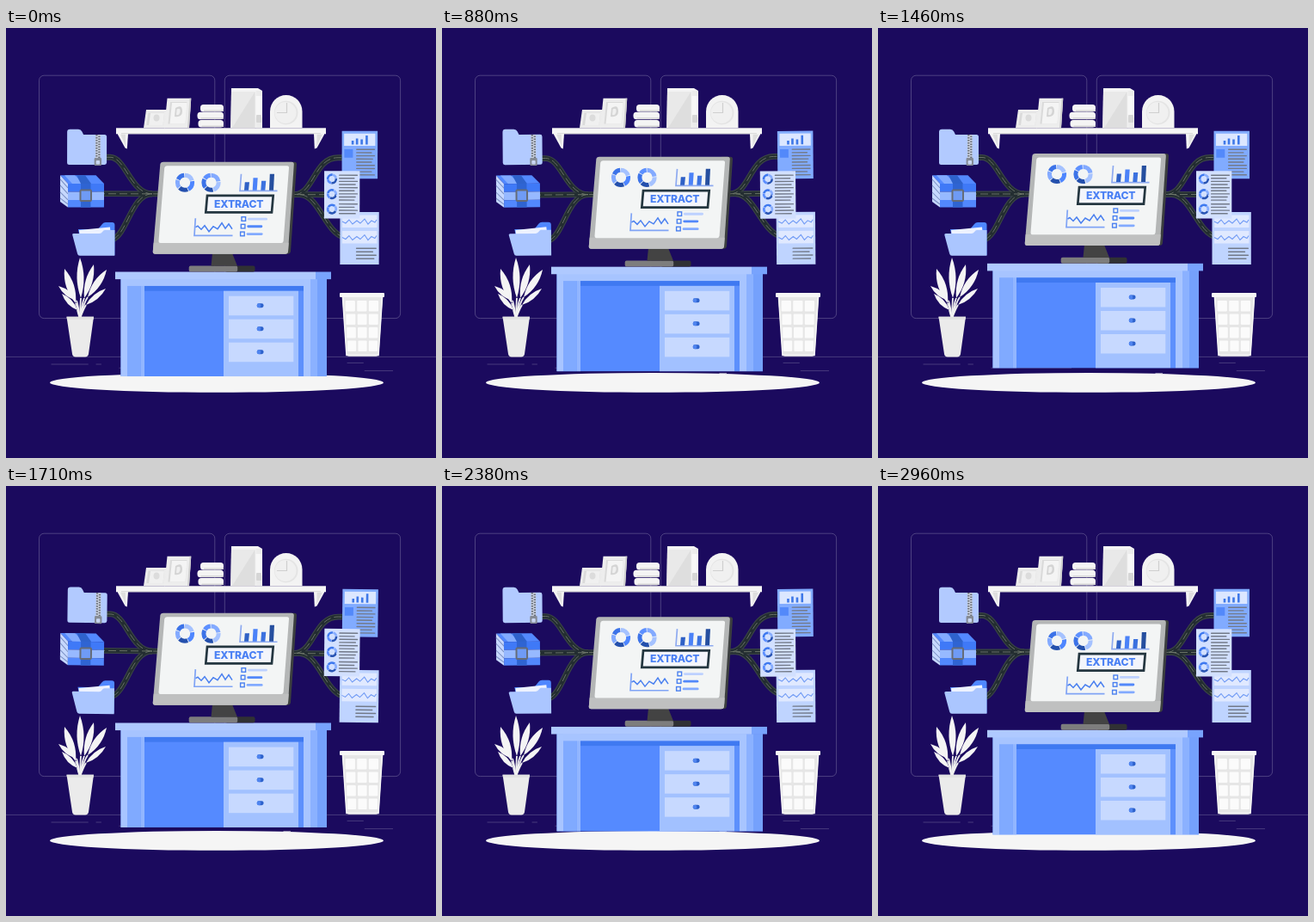
These frames come from a looping animation (500 px wide and 500 px high, 3 s). An HTML page:

```html
<!DOCTYPE html>
<html lang="en">
<head>
<meta charset="utf-8">
<title>Extract</title>
<style>
html, body { margin: 0; width: 100%; height: 100%; overflow: hidden; background: #1b0a5e; }
svg { display: block; width: 100vw; height: 100vh; }
text { font: 800 12.2px Inter, "Open Sans", sans-serif; }
</style>
</head>
<body>
<svg id="stage" viewBox="0 0 500 500"></svg>
<script>
const rect = (x, y, w, h, fill, r = 0) =>
  `<rect x="${x}" y="${y}" width="${w}" height="${h}" rx="${r}" fill="${fill}"/>`;
const shape = (d, fill) => `<path d="${d}" fill="${fill}"/>`;
const line = (d, color, w = 1, extra = '') =>
  `<path d="${d}" fill="none" stroke="${color}" stroke-width="${w}" ${extra}/>`;
const group = (id, ...parts) => `<g id="${id}">${parts.join('')}</g>`;
const each = (list, draw) => list.map(draw).join('');

// Ring made of coloured arcs; parts are [percent, colour]
function donut(x, y, r, w, turn, parts) {
  let at = 0;
  return `<g transform="rotate(${turn} ${x} ${y})">` + each(parts, ([size, color]) => {
    const arc = `<circle cx="${x}" cy="${y}" r="${r}" fill="none" stroke="${color}" stroke-width="${w}"
      pathLength="100" stroke-dasharray="${size - 1.5} 200" stroke-dashoffset="${-at}"/>`;
    at += size;
    return arc;
  }) + '</g>';
}

// Rows of text shown as thin strokes of uneven length
const rows = (x, y, w, n, gap) => each([...Array(n).keys()], i =>
  rect(x, y + i * gap, w * (i % 3 == 1 ? .84 : i % 4 == 3 ? .9 : 1), 1.4, '#737a88', .6));

function leaf([tx, ty, bx, by, w]) {
  const len = Math.hypot(tx - bx, ty - by);
  const nx = (ty - by) / len * w, ny = (bx - tx) / len * w;
  const mx = (tx + bx) / 2, my = (ty + by) / 2;
  return shape(`M${bx} ${by}Q${mx + nx} ${my + ny} ${tx} ${ty}Q${mx - nx} ${my - ny} ${bx} ${by}`, '#f4f4f4') +
    line(`M${bx} ${by}Q${(bx + 86) / 2} ${by + 6} 86 338`, '#f0f0f0', 1.8);
}

const faint = '#5b508c';
const wall =
  each([38.5, 254.3], x => `<rect x="${x}" y="55.2" width="204.3" height="282.4" rx="5.7" fill="none" stroke="${faint}" stroke-width=".8"/>`) +
  line('M0 382.4H500', faint, .7) +
  line('M52.5 391H95.7M104.6 391H110.9M131.5 395.3H225M396.6 389.4H415.8M416.8 398.6H450M322.5 401.4H331', faint, .7);

const shelf =
  shape('M130 123H142L140.8 140.5L138.5 139.5L130 124Z', '#f4f4f4') +
  shape('M133 123.5H139V137Z', '#dedede') +
  shape('M370 123H358L358.8 140.5L361.5 139.5L370 124Z', '#f4f4f4') +
  shape('M368 123.5H361.5V137Z', '#dedede') +
  rect(128, 116.3, 244, 7, '#f5f5f5') + rect(134, 122, 232, 1.2, '#dcdcdc') +
  shape('M163 95H187L185 116.3H160Z', '#ececec') +
  shape('M165.5 98.5H184L182.5 113H163.5Z', '#dadada') +
  shape('M168 99H184L182.5 113H166Z', '#f0f0f0') +
  `<ellipse cx="175" cy="104.5" rx="3.5" ry="4" fill="#dcdcdc"/>` +
  shape('M187.5 81.7H215.3L213 116.3H184Z', '#ededed') +
  shape('M213.5 81.7H215.3L213 116.3H211Z', '#cfcfcf') +
  shape('M191 86H210.5L208.5 111.5H188.5Z', '#dadada') +
  shape('M193 87H210.5L208.5 111.5H190.5Z', '#f4f4f4') +
  shape('M197 93Q205 88 205 97Q205 104 196 103Z', '#d4d4d4') +
  shape('M198.5 94.5Q203 92 202.5 97T198 101Z', '#efefef') +
  each([[226, 89, 27], [222.5, 97.7, 30.5], [223.5, 107, 29.5]], ([x, y, w]) =>
    rect(x, y, w, 8.6, '#f4f4f4', 3.5) + rect(x + 4, y + 6.4, w - 4, 1.6, '#d9d9d9')) +
  shape('M262 70H293L298 73V116.3H261.5Z', '#f4f4f4') +
  shape('M262 74H289.5V116.3H261Z', '#e9e9e9') + shape('M289.5 74V116.3H263Z', '#dedede') +
  rect(290.5, 73, 7.5, 43.3, '#ebebeb') + rect(290.5, 79, 7.5, 25, '#f7f7f7') +
  rect(291, 101, 6, 9, '#d6d6d6', 1) +
  shape('M307 116.3V97A18.7 19 0 0 1 344.5 97V116.3Z', '#f3f3f3') +
  `<circle cx="325.7" cy="98.5" r="13.8" fill="#e4e4e4"/><circle cx="325" cy="98.5" r="12.5" fill="#f0f0f0"/>` +
  line('M326.5 87V98.5H315', '#cfcfcf', 1.2);

const ends = ['M106 193H180', 'M116 150.5H121C139 150.5 145 193 170 193', 'M124 246C141 240 146 193 170 193',
  'M325 193.5H376', 'M335 193.5C358 193.5 358 150.5 386 150.5H394', 'M342 193.5C364 195 371 237 393 243'];
const pipes = each(ends, d => line(d, '#3a4545', 6.8)) + each(ends, d => line(d, '#232d31', 4.6)) +
  each(ends, d => line(d, '#70796c', .9, 'stroke-dasharray="9 4"'));

const leftIcons =
  // zipped folder
  shape('M71 121Q71 117.7 74.3 117.7H84Q87 117.7 88.3 120.5L90 124H114.5Q117 124 117 126.5V156.5Q117 159 114.5 159H73.5Q71 159 71 156.5Z', '#b2caff') +
  rect(104, 124, 5.6, 28, '#c9cfdd') +
  line('M105.3 124V151', '#69707b', 2.2, 'stroke-dasharray="1.5 1.5"') +
  line('M108.3 125.5V152', '#69707b', 2.2, 'stroke-dasharray="1.5 1.5"') +
  rect(102.6, 151, 8.4, 9, '#858b95', 1.2) + rect(104.6, 154, 4.4, 4.5, '#c9d6f2', 1) +
  // parcel
  shape('M63 171.3H104.5L114 181H72Z', '#5389ff') +
  shape('M68 171.3H80L90 181H77Z', '#82abff') +
  shape('M82 171.3H92L99 181H87Z', '#2e62cc') +
  shape('M63 171.3L72 181V208.5L63 202Z', '#c6d8ff') +
  line('M63 176L72 186M63 183L72 193M63 191L72 200M63 198L72 205', '#7a8fc0', 1) +
  rect(72, 181, 42, 9.5, '#3f79f7') + rect(72, 190.5, 42, 9.5, '#97b9ff') +
  rect(72, 200, 42, 8.5, '#5288fd') + rect(87, 181, 11.5, 27.5, '#2f64d2') +
  `<rect x="86.5" y="188.5" width="12.5" height="12.5" rx="1" fill="#6f9bf5" stroke="#656c78" stroke-width="2"/>` +
  // open folder
  shape('M84 234H107L112 228Q113.5 226 116 226H123.5Q126.5 226 126.5 229V264H90Z', '#4f87ff') +
  shape('M85 235L121 231.5L124 262H88Z', '#edf2ff') +
  shape('M77.3 240.5Q77 239 79 239H108.5Q111 239 112.2 237T115 235H126.5V264.8H86Q83.7 264.8 83.2 262.5Z', '#abc6ff');

const zigzag = y => line(`M391 ${y}l4 2 4-4 4 5 5-4 4 3 5-5 4 6 4-4 4 2 2-3`, '#729cf5', 1.1);
const blues = [[30, '#3d78ef'], [20, '#87adff'], [30, '#2854b4'], [20, '#5b8eff']];
const rightIcons =
  rect(390.5, 119.8, 41.5, 55.5, '#81abff') + rect(393, 122.8, 36.3, 14.2, '#dce7ff') +
  line('M403 135.5V131M408 135.5V128.5M413.5 135.5V129.5M419.3 135.5V125', '#3e78e8', 2.6) +
  rect(393.3, 141, 10, 9.8, '#5389fa') + rows(407, 140.5, 22, 9, 3.7) +
  rect(388.5, 214, 45.3, 61, '#bfd4ff') + rect(391, 217.5, 40.5, 14.5, '#e0e9ff') +
  rect(391, 236, 40.5, 14.5, '#e0e9ff') + zigzag(225) + zigzag(243.5) + rows(407, 255.5, 24, 4, 4) +
  rect(370, 166.2, 41.3, 55.3, '#d2e0ff') +
  each([175.5, 193.2, 210.6], y => donut(379, y, 4.8, 2.6, y, blues)) +
  rows(387, 170.5, 22, 4, 3.6) + rows(387, 185, 22, 5, 3.6) + rows(387, 204, 22, 4, 3.7);

const desk =
  rect(133.5, 292, 239.5, 113.3, '#558aff') +
  rect(133.5, 292, 7.5, 113.3, '#a8c5ff') + rect(141, 292, 15.5, 113.3, '#80aaff') +
  rect(156.5, 292, 4.5, 113.3, '#92b6ff') +
  rect(161, 300, 185, 6, '#3f79f1') + rect(141, 292, 205, 8.2, '#a7c4ff') +
  rect(253, 306, 87, 99.3, '#a2c1ff') + rect(340, 306, 6, 99.3, '#5d90fc') +
  each([312, 339, 366], y => rect(259, y, 75.3, 22.5, '#c7d9ff') +
    rect(291.8, y + 8.5, 7.8, 5, '#2d62cc', 2.4) + rect(291.8, y + 8.5, 4.4, 5, '#4f84ef', 2)) +
  rect(346, 292, 8, 113.3, '#a8c5ff') + rect(354, 292, 8, 113.3, '#8bb1ff') +
  rect(362, 292, 11, 113.3, '#75a1fc') +
  rect(127, 283.8, 233, 8.6, '#afc9ff') + rect(360, 283.8, 18, 8.6, '#78a3fd');

const monitor =
  rect(255, 276.7, 34.5, 7, '#303133', 2) + rect(212.7, 276.7, 56.5, 7, '#7d7d7d', 2) +
  shape('M240 262H263L269 277H238.5Z', '#434343') +
  shape('M325 156H335Q338.3 156 338 159L331 260Q330.6 263 327 263H320Z', '#3c3f3f') +
  shape('M183 156H332Q335 156 334.8 159L328 260Q327.7 263 324.5 263H173.5Q170.6 263 170.8 260L179.3 159Q179.6 156 183 156Z', '#b4b6b6') +
  shape('M171.7 250H328.7L328 260Q327.7 263 324.5 263H173.5Q170.6 263 170.8 260Z', '#bfc0c0') +
  shape('M187 160.5H327Q329.3 160.5 329 163L322.6 248Q322.4 250.3 320 250.3H179.5Q177.3 250.3 177.5 248L184.2 163Q184.5 160.5 187 160.5Z', '#f3f5f5');

const screen =
  donut(208, 180, 8.6, 5, -90, [[22, '#a5c2ff'], [22, '#4e86ff'], [20, '#2450ad'], [18, '#83aaff'], [18, '#3c73e8']]) +
  donut(238.5, 180, 8.6, 5, -90, [[24, '#83aaff'], [22, '#a5c2ff'], [18, '#2450ad'], [20, '#3c73e8'], [16, '#5d90ff']]) +
  line('M273.5 170L272 189.6H315.5', '#8eaaf0', 1.7) +
  each([[277, 179.5, '#2f61c6'], [286.7, 174.5, '#4b82f8'], [296.3, 178, '#3b71df'], [306, 170, '#264f9f']],
    ([x, y, c]) => shape(`M${x + .8} ${y}h5.2L${x + 5} 189H${x}Z`, c)) +
  shape('M234 195.2H310.7L309 214.7H232.3Z', '#f3f5fb') +
  line('M234 195.2H310.7L309 214.7H232.3Z', '#243640', 2.7) +
  '<text x="270.8" y="209.3" text-anchor="middle" textLength="57.5" fill="#4a80f4">EXTRACT</text>' +
  line('M220.3 221.5L219 241.6H263.5', '#80a4f5', 1.7) +
  line('M220.5 232L223 230.5L227 234.5L231 230L236 237L241 231L246 234L251 227L255 233.5L259 228L263 234', '#4a80f0', 1.5) +
  each([[274, 220, 23, '#bdd1ff'], [273.3, 228.6, 18, '#5288fa'], [272.6, 237.4, 19, '#82aaff']], ([x, y, w, c]) =>
    `<rect x="${x}" y="${y}" width="4.6" height="4.6" fill="#f3f5f5" stroke="#4a80f0" stroke-width="1.4"/>` +
    rect(x + 7, y + 1, w, 2.8, c, 1.4));

const plant =
  each([[86, 267, 87, 314, 8], [68, 280, 81, 320, 9], [102, 275, 91, 314, 8], [117, 281, 95, 313, 8],
    [61, 300, 82, 317, 6], [116, 303, 93, 322, 6], [65, 309, 83, 328, 6]], leaf) +
  shape('M70.5 335.8H102L96 379Q95.5 382.4 92 382.4H81Q77.5 382.4 77 379Z', '#ebebeb') +
  shape('M70.5 335.8H102L101.5 339H71Z', '#e2e2e2');

const bin =
  shape('M391 312H438L433.5 379Q433.2 381.7 430 381.7H399Q396 381.7 395.7 379Z', '#e6e6e6') +
  each([0, 1, 2, 3], r => each([0, 1, 2], c => {
    const y = 317 + r * 15.5, x = 394.6 + r * .8 + c * (13.6 - r * .4);
    return rect(x, y, 11.3 - r * .35, 12.5, '#fbfbfb', 1);
  })) +
  line('M391.5 313L396 380.5H433L437.5 313', '#f6f6f6', 1.6) +
  rect(388, 308, 52, 5, '#f6f6f6', 1);

document.getElementById('stage').innerHTML = wall +
  '<ellipse cx="245" cy="412.4" rx="194" ry="11.4" fill="#f5f5f5"/>' +
  line('M322.5 401.6H331', '#c9c6d6', .7) +
  shelf + plant + bin +
  group('pipes', pipes) + group('left', leftIcons) + group('right', rightIcons) +
  group('desk', desk, monitor, screen);

const pivots = { pipes: [252, 196], left: [95, 191], right: [402, 197.5] };

function frame() {
  const t = performance.now() + 40;
  const rise = 1 - Math.abs(t % 3000 / 1500 - 1);
  const sway = 1 - Math.abs((t / 1500 + .25) % 1 * 4 - 2);
  document.getElementById('desk').setAttribute('transform', `translate(0 ${-10 * rise})`);
  for (const id in pivots)
    document.getElementById(id).setAttribute('transform', `rotate(${-1 * -sway} ${pivots[id].join(' ')})`);
  requestAnimationFrame(frame);
}
frame();
</script>
</body>
</html>
```
